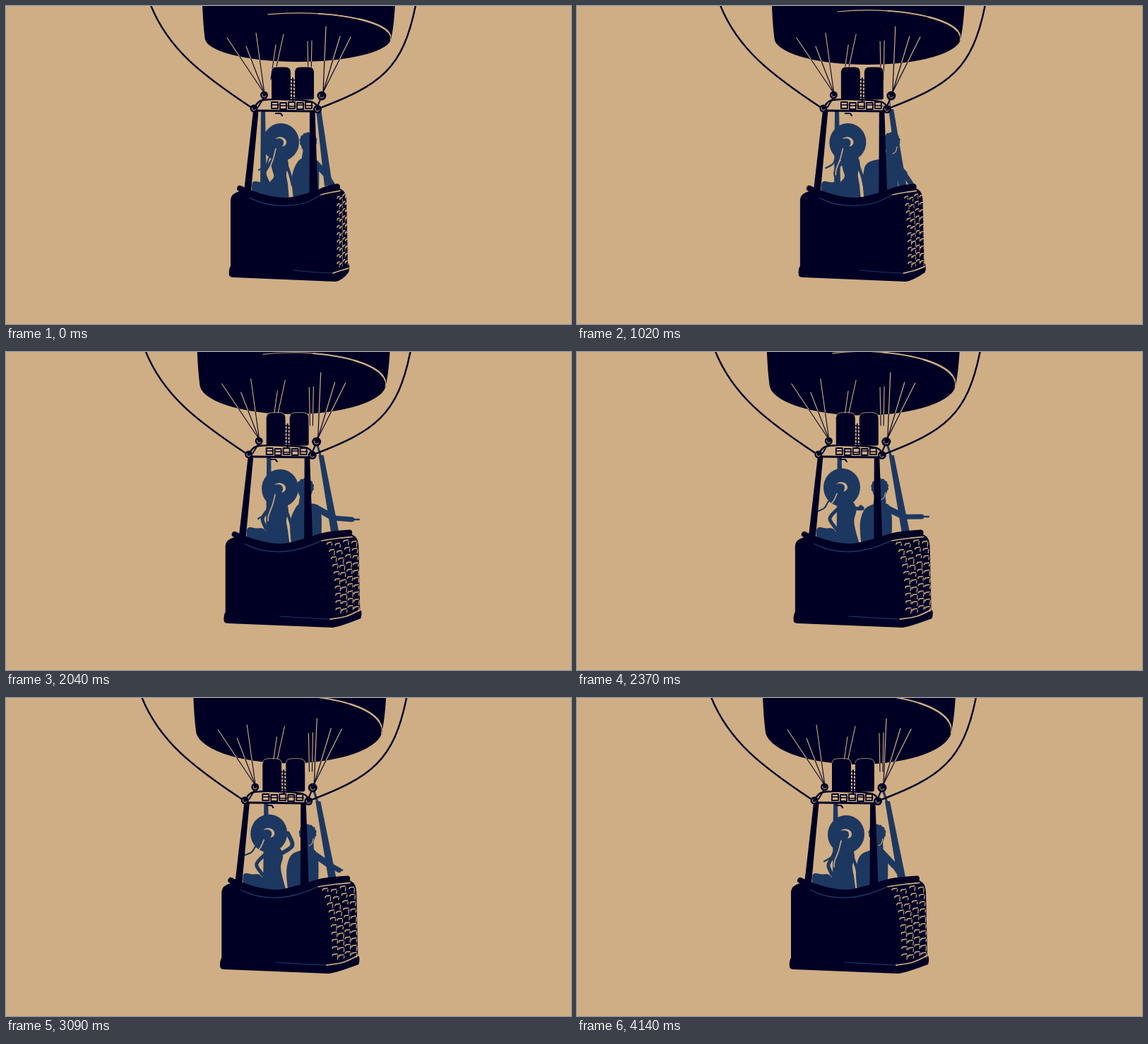
Animation of 800 by 450 pixels, one loop 4.17 s. Source, as an HTML page with a canvas:

```html
<!DOCTYPE html>
<html lang="en">
<head>
<meta charset="utf-8">
<title>Balloon ride</title>
<style>
html, body { margin: 0; width: 100%; height: 100%; overflow: hidden; background: #cfae85; }
canvas { display: block; width: 800px; height: 450px; }
</style>
</head>
<body>
<canvas id="stage" width="800" height="450"></canvas>
<script>
const c = document.getElementById('stage').getContext('2d');
const SAND = '#cfae85', INK = '#000025', BLUE = '#1d3860';
const LOOP = 4170, STEP = 30, LAST = 4140;

const mix = (a, b, k) => a + (b - a) * k;

function ramp(t, a, b) {
  const u = Math.min(1, Math.max(0, (t - a) / (b - a)));
  return u * u * (3 - 2 * u);
}

// Rises from a to b, falls from d to e
const pulse = (t, a, b, d, e) => ramp(t, a, b) - ramp(t, d, e);

function paint(color, width) {
  if (width) {
    c.strokeStyle = color;
    c.lineWidth = width;
    c.stroke();
  } else {
    c.fillStyle = color;
    c.fill();
  }
}

function trace(p) {
  for (let i = 0; i < p.length - 1; i++) {
    const a = p[Math.max(0, i - 1)], b = p[i], d = p[i + 1], e = p[Math.min(p.length - 1, i + 2)];
    c.bezierCurveTo(b[0] + (d[0] - a[0]) / 6, b[1] + (d[1] - a[1]) / 6,
      d[0] - (e[0] - b[0]) / 6, d[1] - (e[1] - b[1]) / 6, d[0], d[1]);
  }
}

// Smooth path through points: stroked with a width, filled without
function curve(p, color, width) {
  c.beginPath();
  c.moveTo(...p[0]);
  trace(p);
  paint(color, width);
}

function poly(p, color, width) {
  c.beginPath();
  p.forEach(q => c.lineTo(...q));
  paint(color, width);
}

const line = (x1, y1, x2, y2, color, width) => poly([[x1, y1], [x2, y2]], color, width);

function oval(x, y, rx, ry, color, turn = 0) {
  c.beginPath();
  c.ellipse(x, y, rx, ry, turn, 0, 7);
  paint(color);
}

function drawWires(tilt, color) {
  const shift = 16 * tilt;
  for (const [x, y] of [[313, 45], [340, 57], [354, 38]]) line(x, y, 366, 124, color, 1.1);
  for (const [x, y] of [[453, 29], [473, 43], [488, 44]]) line(x, y, 449, 122, color, 1.2);
  for (const [x, y, foot] of [[393, 40, 379], [382, 55, 375], [427, 50, 428], [433, 49, 432]])
    line(x + shift, y, foot + shift, 104, color, 1.1);
}

// The mouth is an ellipse that opens up as it tilts
function drawBalloon(tilt) {
  const x = 413.5, y = 45, rx = 132, ry = mix(34, 49, tilt);
  drawWires(tilt, INK);
  c.save();
  c.beginPath();
  c.moveTo(551, -2);
  c.quadraticCurveTo(549, 30, x + rx, y);
  c.ellipse(x, y, rx, ry, 0, 0, Math.PI);
  c.quadraticCurveTo(279, 25, 278, -2);
  c.closePath();
  paint(INK);
  c.clip();
  drawWires(tilt, SAND);
  for (const [from, to, w] of [[-1.9, .1, 1.1], [-1.35, -.1, 1.8], [-.85, -.25, 2.4]]) {
    c.beginPath();
    c.ellipse(x, y, rx - .5, ry + 1, 0, from, to);
    paint(SAND, w);
  }
  c.restore();
}

function drawRopes() {
  c.beginPath();
  c.moveTo(205, -1);
  c.bezierCurveTo(230, 61, 277, 97, 348, 144);
  c.moveTo(580, -1);
  c.bezierCurveTo(562, 89, 530, 112, 443, 145);
  paint(INK, 2.4);
}

function ring(x, y, r) {
  oval(x, y, r, r, INK);
  c.beginPath();
  c.arc(x, y, r * .5, .4, 3.6);
  paint(SAND, 1);
}

function drawBurner() {
  for (const x of [376, 409]) {
    c.beginPath();
    c.roundRect(x, 86.5, 27, 46, [6, 6, 3, 3]);
    paint(INK);
    curve([[x, 92], [x + 4, 86.5], [x + 21, 86], [x + 27, 91], [x + 27.5, 104]], SAND, .8);
  }
  for (let y = 104; y < 130; y += 5) line(402, y, 410, y + 1, INK, 1.6);
  line(406, 102, 406, 135, INK, 2);
  curve([[352, 143], [361, 134], [385, 132], [430, 135], [441, 142]], INK, 2.4);
  line(352, 148, 440, 149, INK, 3.2);
  for (let i = 0; i < 5; i++) {
    const x = 376 + i * 12;
    c.beginPath();
    c.rect(x, 136 + i % 2, 9, 9);
    paint(INK, 1.8);
    line(x, 140 + i % 3, x + 10, 140 + i % 3, INK, 1.5);
  }
  poly([[382, 152], [389, 152], [391, 155]], INK, 2.2);
  line(366, 128, 357, 143, INK, 2);
  line(447, 128, 440, 144, INK, 2);
  ring(365.5, 126, 5.5);
  ring(447, 127, 6.5);
  ring(351, 145, 5.5);
  ring(441, 146, 6);
}

function drawBackPoles(side) {
  const l = mix(364, 381, side), t = mix(442, 454, side), b = mix(456, 474, side);
  poly([[l - 3, 149], [l + 3, 149], [l + 5, 255], [l - 4, 255]], BLUE);
  poly([[t - 3, 146], [t + 4, 146], [b + 6, 253], [b - 5, 255]], BLUE);
  line(t - 7 * side, 126, t, 148, BLUE, 3 * side + .1);
}

function drawMan(t, side, hold) {
  const lean = pulse(t, 300, 900, 1150, 1550);
  const kiss = pulse(t, 1250, 1600, 2100, 2500);
  const point = pulse(t, 1650, 1980, 2850, 3300);
  const x = mix(428, 440, side) + 15 * lean - 8 * kiss;
  const l = mix(407, 412, side), r = mix(441, 453, side) + 9 * lean;

  oval(x, 194, 10.5, 14, BLUE);
  for (let a = 2.8; a < 6.8; a += .47)
    oval(x + Math.cos(a) * 9.5, 191 + Math.sin(a) * 9.5, 3, 3, BLUE);
  poly([[x - 7, 202], [x + 8, 202], [x + 9, 220], [x - 10, 220]], BLUE);
  const neck = Math.min(x, r - 8);
  curve([[l, 274], [l - 2, 252], [l - 1, 236], [l + 5, 222], [neck - 8, 215], [neck + 6, 214],
    [r - 1, 218], [r + 2, 232], [r + 2, 258], [r, 274]], BLUE);
  curve([[x + 2, 209], [x + 6, 206], [x + 8, 199]], SAND, 1.1);

  const elbow = [r + 11 + 9 * point, 237 - 2 * point - 3 * hold];
  const hand = [mix(r + 21, 497, point), mix(252, 237 - 7 * hold, point)];
  poly([[r - 3, 222], elbow], BLUE, 9);
  poly([elbow, hand], BLUE, 7);
  line(...hand, hand[0] + 10 * point, hand[1], BLUE, 2.5);
}

function drawWoman(t, side, hold) {
  const raise = pulse(t, 2100, 2600, 3300, 3900);
  const turn = pulse(t, 300, 900, 1100, 1550);
  const x = mix(389, 396, side) - 6 * turn - 21 * hold, y = 193 - 2.5 * hold;
  const l = mix(375, 380, side), r = mix(400, 408, side) - 6 * hold;
  const hip = mix(401, 410, side), out = l - 10 - 6 * hold;

  curve([[349, 274], [349, 250], [362, 249.5], [374, 252], [385, 274]], BLUE);
  curve([[hip, 274], [r - 1, 252], [r - 3, 238], [r, 224], [r - 5, 212], [l + 5, 211],
    [l, 221], [l + 2, 232], [l + 4, 242], [l - 4, 253], [l - 12, 274]], BLUE);
  curve([[l + 2, 219], [out + 3, 231], [out + 1, 238], [l - 4, 250]], BLUE, 5);
  curve([[r - 4, 221], [mix(r + 2, 418, raise), mix(238, 209, raise)],
    [mix(r + 6, x + 27, raise), mix(254, y, raise)]], BLUE, mix(4, 6, raise));

  oval(x, y, 26, 27, BLUE, .15);

  const root = [x - 7, y + 9];
  const flow = (dx, dy, bend) => [root, [root[0] + dx * .38, root[1] + dy * .4],
    [root[0] + dx * .62 + bend, root[1] + dy * .78], [root[0] + dx, root[1] + dy]];
  const flutter = 4 * Math.sin(t / 260);
  curve(flow(-24 - 12 * hold, 30 - 9 * hold + flutter, 1), BLUE, 2.2);
  curve(flow(-10, 37 - 28 * hold, -3), SAND, 1.6);

  // Crown of the hat
  c.beginPath();
  c.moveTo(x - 8, y - 5);
  c.bezierCurveTo(x - 1, y - 11, x + 9, y - 6, x + 8, y + 1);
  c.quadraticCurveTo(x + 7, y + 5, x + 2, y + 6);
  c.bezierCurveTo(x + 7, y - 1, x + 3, y - 8, x - 8, y - 5);
  paint(SAND);
}

function drawPoles() {
  poly([[350, 149], [357.5, 149], [347, 262], [337, 262]], INK);
  poly([[430, 148], [437.5, 148], [441.5, 266], [429.5, 266]], INK);
}

function drawWeave(side) {
  const rows = 10, cols = 4, w = mix(4, 9, side);
  for (let row = 0; row < rows; row++) {
    for (let col = 0; col < cols; col++) {
      const bow = 14 * side * (1 - row / rows) ** 3;
      const x = mix(469, 475, side) + col * w - bow * (1 - col / cols);
      const y = 270 + row * 10.3 - col * 1.6 + (col % 2) * 3;
      poly([[x, y + 2], [x + 1, y], [x + w * .75, y - .8]], SAND, 1.5);
      line(x + w * .85, y + 1, x + w * .8, y + 4 + (row * 7 + col * 5) % 4, SAND, mix(.8, 1.2, side));
    }
  }
}

function drawBasket(side) {
  const top = mix(477, 504, side), right = top + 7, corner = mix(466, 470, side);
  const rim = [[331, 258], [347, 265], [370, 272], [400, 275], [432, 267.5], [mix(454, 462, side), 259], [top - 8, 255.5]];
  c.beginPath();
  c.moveTo(316, 381);
  c.quadraticCurveTo(315, 372, 318, 368);
  c.lineTo(318, 274);
  c.quadraticCurveTo(319, 265, 331, 262);
  c.lineTo(...rim[0]);
  trace(rim);
  c.lineTo(top, 261);
  c.quadraticCurveTo(top + 4, 264, top + 5, 274);
  c.lineTo(right, 363);
  c.quadraticCurveTo(right + 4, 368, right + 1, 377);
  c.quadraticCurveTo(corner + 10, 389, corner, 390);
  c.lineTo(322, 384);
  c.quadraticCurveTo(317, 384, 316, 381);
  paint(INK);
  curve(rim, INK, 8);

  const bend = [mix(446, 455, side), 267];
  curve([[345, 271.5], [368, 280], [397, 282.5], [425, 278], bend], BLUE, 1.3);
  curve([bend, [mix(bend[0], top, .5), 263.5], [top - 4, 261.5]], SAND, 1.6);

  drawWeave(side);
  curve([[mix(407, 394, side), 374], [435, 376.5], [corner - 3, 378]], BLUE, 1.2);
  curve([[corner - 3, 378], [mix(corner, right, .5), 374], [right + 1, mix(371, 364, side)]], SAND, 1.8);
}

function draw(t) {
  const u = t / LAST, side = ramp(t, 0, 2500);
  const tilt = Math.sin(Math.PI / 2 * u ** 1.25);
  const hold = pulse(t, 2100, 2600, 2800, 3400);
  c.fillStyle = SAND;
  c.fillRect(0, 0, 800, 450);
  c.save();
  c.translate(-7.5 * (1 - Math.cos(Math.PI * u)), 0);
  c.lineCap = c.lineJoin = 'round';
  drawBackPoles(side);
  drawMan(t, side, hold);
  drawWoman(t, side, hold);
  drawBalloon(tilt);
  drawRopes();
  drawPoles();
  drawBurner();
  drawBasket(side);
  c.restore();
}

const start = performance.now();
function tick() {
  const t = (performance.now() - start) % LOOP;
  draw(Math.floor(t / STEP) * STEP);
  requestAnimationFrame(tick);
}
tick();
</script>
</body>
</html>
```
